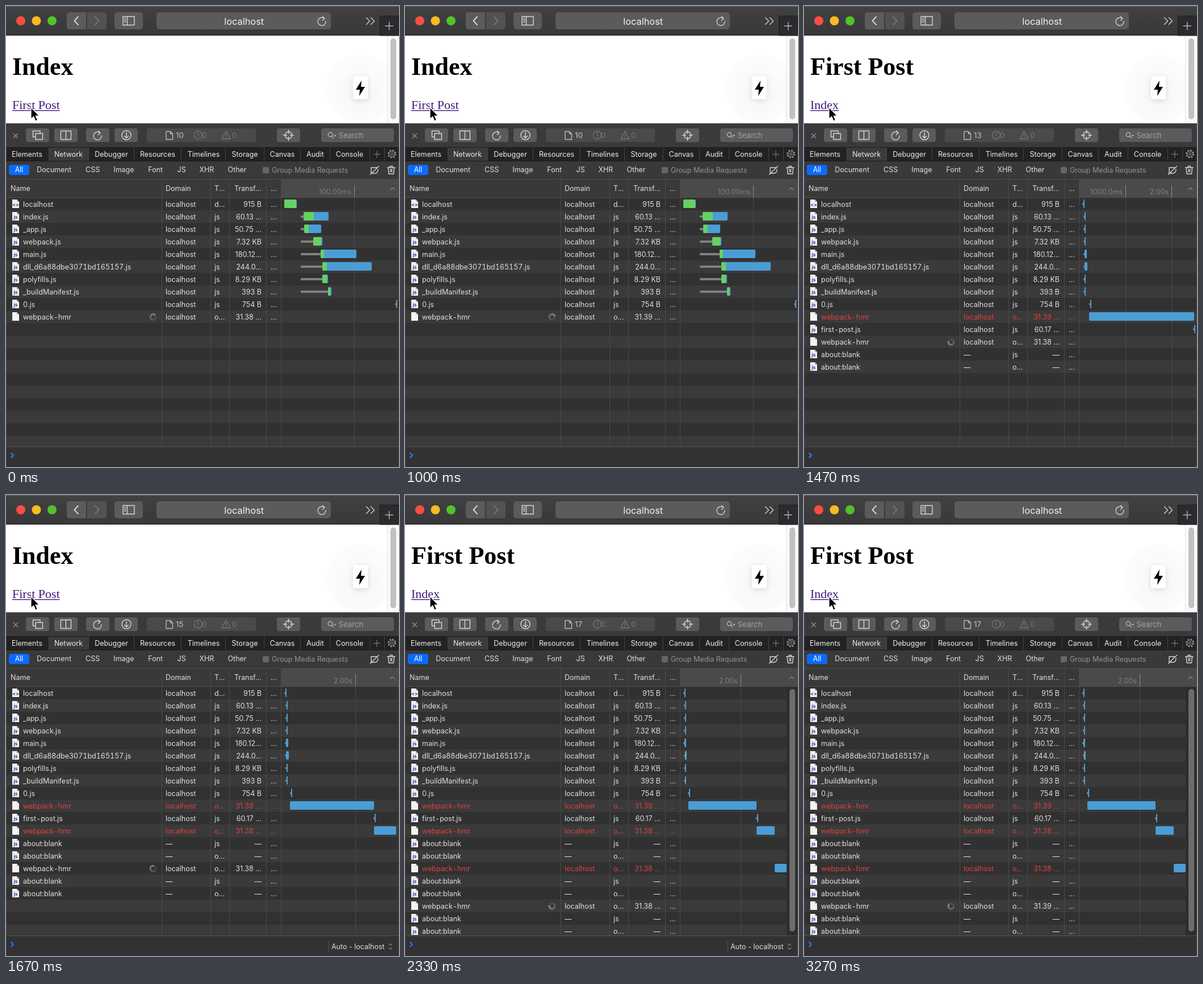
Write an HTML page that moves like this. It is 692 px wide and 810 px high and loops after 3.39 s.

```html
<!DOCTYPE html>
<html lang="en">
<head>
<meta charset="utf-8">
<title>Network panel</title>
<style>
html, body { margin: 0; width: 100%; height: 100%; overflow: hidden; background: #323232; }
svg { display: block; }
#stage { font: 12.5px Inter, "Open Sans", sans-serif; fill: #dfdfdf; }
text { white-space: pre; }
.mid { text-anchor: middle; }
.end { text-anchor: end; }
.serif { font-family: "Liberation Serif", "Noto Serif", serif; }
.title { font-size: 44px; font-weight: 700; fill: #000; }
.link { font-size: 22px; fill: #3f1a7a; }
.name { font-variant-numeric: tabular-nums; }
.line { fill: none; stroke: #d6d6d6; stroke-width: 1.4; stroke-linecap: round; stroke-linejoin: round; }
.bold { stroke-width: 1.9; }
.thin { stroke-width: 1; stroke: #b4b4b4; }
.soft { stroke: #b8b8b8; }
.dim { stroke: #747476; }
.btn { fill: #5b5b5d; }
.grid { stroke: #4a4a4a; }
.tick { stroke: #8c8c8c; }
.scale { fill: #7e7e7e; text-anchor: end; }
.failed { fill: #dc423d; }
.tag { font-size: 8.5px; font-weight: 700; fill: #3b32a0; text-anchor: middle; }
#tabs { fill: #ececec; }

.home, .post, .home2, .post2, .early, .late, .early2, .late2, #context {
  animation: 3390ms step-end infinite;
}
.home { animation-name: home; }
.post { animation-name: post; }
.home2 { animation-name: home2; }
.post2 { animation-name: post2; }
.early { animation-name: early; }
.late { animation-name: late; }
.early2 { animation-name: early2; }
.late2 { animation-name: late2; }
#context { animation-name: context; }
.spin { animation: spin 3390ms steps(47) infinite; }
@keyframes home { 0% { opacity: 1 } 31.33%, 100% { opacity: 0 } }
@keyframes post { 0% { opacity: 0 } 31.33% { opacity: 1 } 49.03%, 100% { opacity: 0 } }
@keyframes home2 { 0% { opacity: 0 } 49.03% { opacity: 1 } 68.5%, 100% { opacity: 0 } }
@keyframes post2 { 0% { opacity: 0 } 68.5%, 100% { opacity: 1 } }
@keyframes early { 0% { opacity: 1 } 9.6%, 100% { opacity: 0 } }
@keyframes late { 0% { opacity: 0 } 9.6%, 100% { opacity: 1 } }
@keyframes early2 { 0% { opacity: 1 } 86.3%, 100% { opacity: 0 } }
@keyframes late2 { 0% { opacity: 0 } 86.3%, 100% { opacity: 1 } }
@keyframes context {
  0% { opacity: 0 } 31.33% { opacity: 1 } 39% { opacity: 0 }
  49.03% { opacity: 1 } 56.8% { opacity: 0 } 68.5% { opacity: 1 } 76.5%, 100% { opacity: 0 }
}
@keyframes spin { to { transform: rotate(1410deg) } }
</style>
</head>
<body>
<svg id="stage" width="692" height="810" viewBox="0 0 692 810">
  <defs>
    <linearGradient id="bar" x2="0" y2="1"><stop stop-color="#414144"/><stop offset="1" stop-color="#38383b"/></linearGradient>
    <g id="sheet">
      <path d="M0 0H8L12 4V15H0Z" fill="#f3f3f3"/>
      <path d="M8 0V4H12Z" fill="#b5b5b5"/>
    </g>
    <g id="reload" class="line">
      <path d="M4.5 -5A7 7 0 1 0 7 0M1.5 -8.5L5 -5L1.5 -1.8"/>
    </g>
  </defs>

  <!-- page -->
  <path d="M0 52H692V206H0Z" fill="#fff"/>
  <circle cx="624" cy="146" r="60" fill="#000" opacity=".012"/>
  <rect x="611" y="123" width="26" height="41" rx="4" fill="#fff"
    style="filter:drop-shadow(0 2px 5px rgba(0,0,0,.12)) drop-shadow(0 8px 20px rgba(0,0,0,.08))"/>
  <path d="M626 131L616 147H623L622 158L632 142H625Z" fill="#000"/>
  <path d="M671 52H692V206H671Z" fill="#fafafa"/>
  <path d="M671.5 52V206" stroke="#e4e4e4"/>
  <rect x="677" y="57" width="10" height="142" rx="5" fill="#c1c1c1"/>

  <!-- table -->
  <path d="M0 206H692V810H0Z" fill="#393939"/>
  <path d="M485 305H692V336H485Z" fill="#4a4a4a"/>
  <g id="stripes"></g>
  <path class="grid" d="M274.5 305V774M360.5 305V774M393.5 305V774M458.5 305V774M484.5 305V774"/>
  <path d="M0 304.5H692M0 336.5H692" stroke="#4e4e4e"/>
  <text x="8" y="324.5">Name</text>
  <text x="281" y="324.5">Domain</text>
  <text x="367" y="324.5">T...</text>
  <text x="402" y="324.5">Transf...</text>
  <text x="466" y="324.5">...</text>
  <path class="line thin" d="M677 323L680.5 319L684 323"/>
  <g id="views"></g>

  <!-- window bar -->
  <path d="M0 0H692V52H0Z" fill="url(#bar)"/>
  <path d="M0 51.5H692" stroke="#1f1f21"/>
  <path d="M0 .5H692" stroke="#66666a"/>
  <circle cx="26" cy="26" r="8" fill="#fb4d43"/>
  <circle cx="53.5" cy="26" r="8" fill="#f8ba25"/>
  <circle cx="81" cy="26" r="8" fill="#52c22b"/>
  <path class="btn" d="M112 11H141V41H112Q107 41 107 36V16Q107 11 112 11Z"/>
  <path d="M143 11H172Q177 11 177 16V36Q177 41 172 41H143Z" fill="#525254"/>
  <path class="line bold" d="M127 19L120.5 26L127 33"/>
  <path class="line bold dim" d="M157 19L163.5 26L157 33"/>
  <rect class="btn" x="191" y="11" width="50" height="30" rx="5"/>
  <path class="line" d="M206 18.5H226V33.5H206ZM213.5 19V33M208.5 22H211M208.5 25H211M208.5 28H211"/>
  <rect class="btn" x="265" y="11" width="307" height="30" rx="5"/>
  <text class="mid" x="419.2" y="33" font-size="16.4" fill="#f1f1f1">localhost</text>
  <use href="#reload" x="556" y="27"/>
  <path class="line" d="M634.5 20.5L640.5 26.5L634.5 32.5M642.5 20.5L648.5 26.5L642.5 32.5"/>
  <path d="M658.5 52V17.5H692V52Z" fill="#2b2b2d" stroke="#1d1d1f"/>
  <path d="M667.5 35H682M674.75 28V42.5" stroke="#b5b5b7" stroke-width="1.4"/>

  <!-- inspector toolbar -->
  <path d="M0 206H692V248H0Z" fill="#3a3a3c"/>
  <path d="M0 206.5H692" stroke="#555557"/>
  <path d="M13 224L21 232M21 224L13 232" stroke="#929294" stroke-width="1.3"/>
  <g class="btn">
    <rect x="35" y="215" width="41" height="24" rx="4"/>
    <rect x="85" y="215" width="41" height="24" rx="4"/>
    <rect x="141" y="215" width="41" height="24" rx="4"/>
    <rect x="191" y="215" width="41" height="24" rx="4"/>
    <rect x="477" y="215" width="41" height="24" rx="4"/>
    <rect x="555" y="215" width="128" height="24" rx="4"/>
  </g>
  <rect x="248" y="215" width="192" height="24" rx="4" fill="#4a4a4c"/>
  <path class="line" d="M51 230H47.5V219.5H60V223M52 224H64.5V234.5H52ZM96.5 219.5H114.5V234.5H96.5ZM105.5 220V234"/>
  <use href="#reload" x="161" y="228"/>
  <g class="line">
    <circle cx="212" cy="227" r="8"/>
    <path d="M212 222V231.5M208.5 228.5L212 232L215.5 228.5"/>
    <circle cx="497.5" cy="227" r="6"/>
    <path d="M497.5 218V224M497.5 230V236M488.5 227H494.5M500.5 227H506.5"/>
    <path class="soft" d="M282 220.5H289.5L293.5 224.5V234.5H282ZM289.5 221V224.5H293"/>
  </g>
  <g class="line dim">
    <circle cx="338.5" cy="227" r="7"/>
    <path d="M338.5 223V228M338.5 230.5V231M387.5 220L395 233.5H380ZM387.5 225V229M387.5 231V231.2"/>
  </g>
  <text x="345" y="231.5" font-size="13.5" fill="#747476">0</text>
  <text x="398" y="231.5" font-size="13.5" fill="#747476">0</text>
  <g class="line soft">
    <circle cx="571" cy="226" r="3.7"/>
    <path d="M573.8 229L576.5 231.8M577.5 227L579 228.5L580.5 227"/>
  </g>
  <text x="585.5" y="231.5" font-size="13.2" fill="#a2a2a4">Search</text>

  <!-- tabs and filters -->
  <path d="M0 248H692V272H0Z" fill="#222223"/>
  <path d="M75 248H145V272H75Z" fill="#3b3b3d"/>
  <path d="M0 248.5H692M0 272.5H692" stroke="#1b1b1c"/>
  <path stroke="#454547" d="M75.5 249V272M145.5 249V272M225.5 249V272M308.5 249V272M386.5 249V272M454.5 249V272M518.5 249V272M570.5 249V272M640.5 249V272M666.5 249V272"/>
  <g id="tabs" class="mid"></g>
  <path d="M647 260.5H659M653 254.5V266.5" stroke="#858587"/>
  <g fill="none" stroke="#a0a0a2">
    <circle cx="679.5" cy="260" r="5"/>
    <circle cx="679.5" cy="260" r="2.2"/>
    <circle cx="679.5" cy="260" r="6.5" stroke-width="2" stroke-dasharray="2.5 2.6"/>
  </g>
  <rect x="5" y="279" width="36" height="18" rx="4" fill="#0a6bfb"/>
  <text class="mid" x="23" y="292" fill="#fff">All</text>
  <g id="filters"></g>
  <rect x="452" y="283" width="11" height="11" rx="2" fill="#666"/>
  <text x="468" y="292.5" fill="#929292">Group Media Requests</text>
  <path class="line" d="M643 294Q643 290 643 284H653M655 287Q655 294 649 294H645M641.5 296L656.5 281.5M671.5 284H685M673 284L674 295H682.5L683.5 284M676 284V281.5H680.5V284M676.5 287L680 291.5M680 287L676.5 291.5"/>

  <!-- console -->
  <path d="M0 774H692V810H0Z" fill="#323232"/>
  <path d="M0 774.5H692" stroke="#555"/>
  <path d="M8.5 785L13 789.5L8.5 794" fill="none" stroke="#1a7bff" stroke-width="2.2"/>
  <g id="context">
    <path d="M568.5 783V804" stroke="#555"/>
    <text x="573" y="798">Auto - localhost</text>
    <path class="line thin" d="M674.5 791.5L677 788.5L679.5 791.5M674.5 795.5L677 798.5L679.5 795.5"/>
  </g>
  <path d="M.5 206V810M691.5 206V810" stroke="#555" opacity=".6"/>

  <path d="M44 178V198.5L48.7 194.2L52 202L55.5 200.5L52.2 193H58.5Z" fill="#000" stroke="#fff" stroke-width="1.2"/>
</svg>
<script>
const $ = id => document.getElementById(id);
const text = (x, y, s, cls = '') => `<text x="${x}" y="${y}" class="${cls}">${s}</text>`;
const rect = (x, y, w, h, fill, r = 0) =>
  `<rect x="${x}" y="${y}" width="${w}" height="${h}" rx="${r}" fill="${fill}"/>`;
const rowTop = i => 337 + 22 * i;

const hmr = 'webpack-hmr|o...|31.38 ...';
const blanks = ['about:blank|js|—', 'about:blank|o...|—'];
const files = [
  'localhost|d...|915 B', 'index.js|js|60.13 ...', '_app.js|js|50.75 ...',
  'webpack.js|js|7.32 KB', 'main.js|js|180.12...', 'dll_d6a88dbe3071bd165157.js|js|244.0...',
  'polyfills.js|js|8.29 KB', '_buildManifest.js|js|393 B', '0.js|js|754 B',
  hmr, 'first-post.js|js|60.17 ...', hmr, ...blanks, hmr, ...blanks, hmr, ...blanks
].map(s => s.split('|'));

// bars: [wait, start, receive, end] or [start, end]
const views = [
  { cls: 'home', page: 'Index', link: 'First Post', count: 10, rows: 10, live: 9,
    ticks: [[613, '100.00ms']], fade: ['early', 'late'],
    bars: [[490, 490, 511, 512], [519, 524, 542, 568], [519, 525, 533, 555], [519, 541, 555, 557],
      [519, 554, 560, 617], [519, 557, 565, 644], [519, 557, 565, 567], [519, 567, 571, 573], [687, 689]] },
  { cls: 'post', page: 'First Post', link: 'Index', count: 13, rows: 14, live: 11,
    ticks: [[566, '1000.0ms'], [647, '2.00s']],
    bars: [[492, 494], [494, 496], [494, 496], [494, 496], [494, 498], [494, 499], [494, 496], [494, 496],
      [504, 506], [502, 687], [687, 689]] },
  { cls: 'home2', page: 'Index', link: 'First Post', count: 15, rows: 17, live: 14,
    ticks: [[615, '2.00s']],
    bars: [[492, 494], [494, 496], [494, 496], [494, 496], [493, 497], [493, 498], [494, 496], [494, 496],
      [502, 504], [500, 648], [649, 651], [648, 687]] },
  { cls: 'post2', page: 'First Post', link: 'Index', count: 17, rows: 20, live: 17,
    ticks: [[591, '2.00s']], fade: ['early2', 'late2'], scroll: true,
    bars: [[492, 494], [493, 495], [493, 495], [493, 495], [492, 495], [491, 493, 494, 496], [493, 495], [493, 495],
      [500, 502], [499, 619], [620, 622], [619, 651], , , [651, 672]] }
];

function bar(b, i) {
  const [wait, start, mid, end] = b.length > 2 ? b : [b[1] - b[0] < 6 ? b[0] - 2 : b[0], b[0], b[0], b[1]];
  const y = rowTop(i) + 3, r = end - start > 4 ? 2 : 1;
  return rect(wait, y + 6, start - wait, 4, '#808080', 1)
    + rect(start, y, end - start, 15, '#4a9dd5', r)
    + (mid > start ? rect(start, y, mid - start, 15, '#66d163', r) : '');
}

function spinner(y) {
  let s = '';
  for (let k = 0; k < 12; k++)
    s += `<path d="M0 -3.5V-6.5" transform="rotate(${30 - 30 * k})" stroke="#e0e0e0" stroke-width="1.2" opacity="${Math.max(.25, 1 - k * .09)}"/>`;
  return `<g transform="translate(259 ${y})"><g class="spin">${s}</g></g>`;
}

function row(v, i) {
  const [name, type, size] = files[i], y = rowTop(i), base = y + 15.5;
  const socket = name === 'webpack-hmr', live = i === v.live;
  const icon = i === 0 ? '&lt;&gt;' : socket ? '' : 'js';
  let sizes = text(450, base, size, 'end');
  const newer = size.replace('.38', '.39');
  if (live && v.fade) sizes = text(450, base, size, 'end ' + v.fade[0]) + text(450, base, newer, 'end ' + v.fade[1]);
  else if (socket && i === 9) sizes = text(450, base, newer, 'end');
  return `<use href="#sheet" x="11" y="${y + 3}"/>` + text(17, y + 14.5, icon, 'tag')
    + `<g class="${socket && !live ? 'failed' : ''}">`
    + text(30, base, name, 'name') + text(281, base, size === '—' ? '—' : 'localhost')
    + text(367, base, type) + sizes + text(466, base, '...') + '</g>'
    + (live ? spinner(y + 11.5) : '');
}

function view(v) {
  let s = text(11, 121.4, v.page, 'serif title') + text(11, 181, v.link, 'serif link');
  s += rect(11, 183, v.link === 'Index' ? 50 : 83.7, 1.4, '#3f1a7a');
  for (const [x, label] of v.ticks)
    s += `<path class="grid" d="M${x + .5} 337V774"/><path class="tick" d="M${x + .5} 315V336"/>`
      + text(x - 5, 331, label, 'scale');
  for (let i = 0; i < v.rows; i++) s += row(v, i);
  v.bars.forEach((b, i) => s += bar(b, i));
  if (v.scroll) s += rect(672, 337, 20, 437, '#2d2d2d') + rect(677, 341, 10, 426, '#6c6c6c', 5);
  return `<g class="${v.cls}">${s}</g>`;
}

$('stripes').innerHTML = files.map((f, i) => rect(0, rowTop(i), 692, 22, i % 2 ? '#3a3a3a' : '#313131')).join('');
$('views').innerHTML = views.map(view).join('');
$('tabs').innerHTML = [['Elements', 37], ['Network', 110], ['Debugger', 185.5], ['Resources', 267], ['Timelines', 348],
  ['Storage', 420.5], ['Canvas', 486.5], ['Audit', 544.5], ['Console', 605]].map(([s, x]) => text(x, 264.5, s)).join('');
$('filters').innerHTML = [['Document', 54.3], ['CSS', 140], ['Image', 189.3], ['Font', 250.3], ['JS', 301.5], ['XHR', 340.5],
  ['Other', 390.5]].map(([s, x]) => text(x, 292, s)).join('');

// request counter sits above the toolbar
const counts = document.createElementNS('http://www.w3.org/2000/svg', 'g');
counts.setAttribute('font-size', '13.5');
counts.setAttribute('fill', '#c2c2c2');
counts.innerHTML = views.map(v => text(299, 231.5, v.count, v.cls)).join('');
$('stage').append(counts);
</script>
</body>
</html>
```
